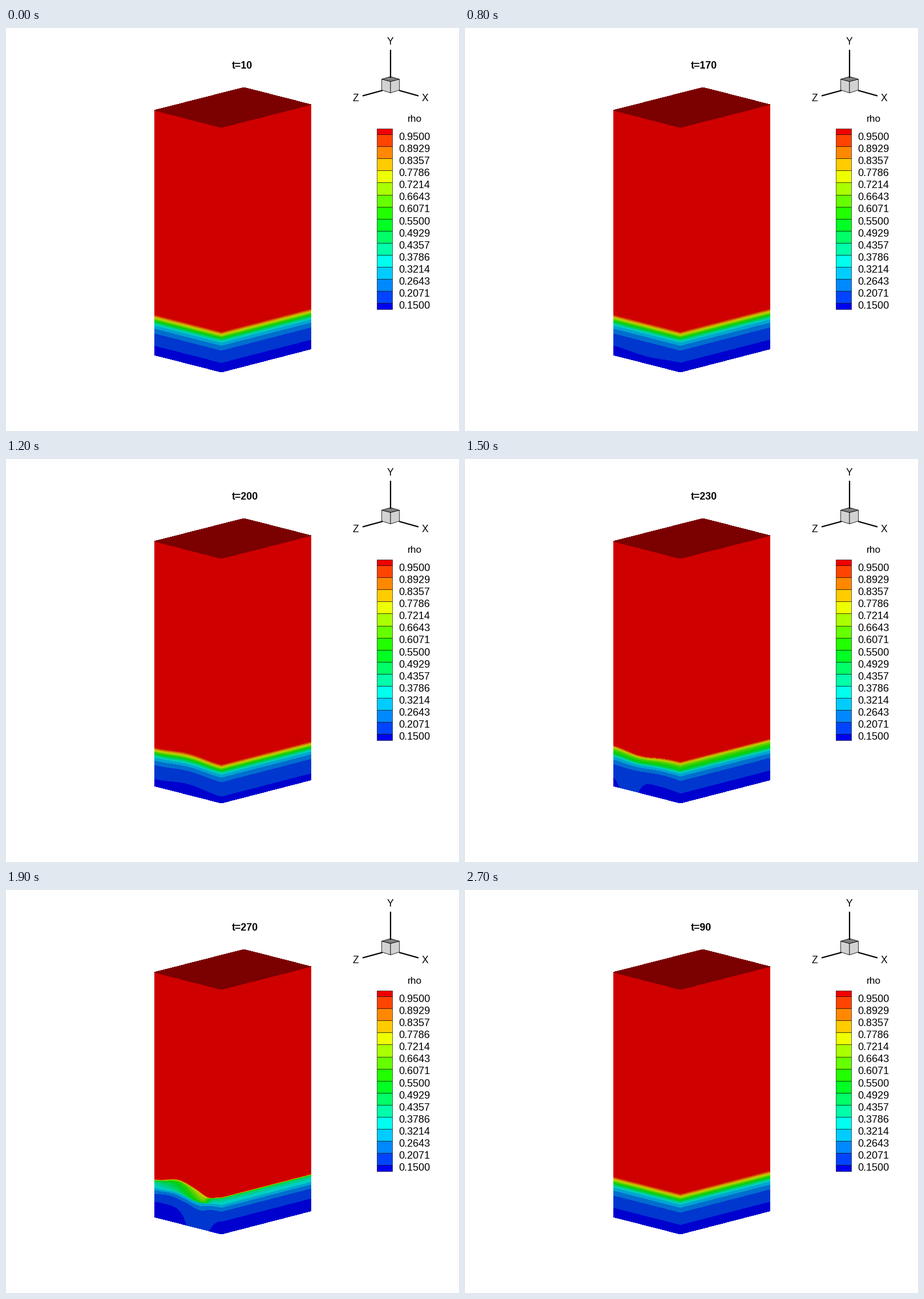
A matplotlib script for the animation above (2.8 s loop, 794x705 px).

```python
import numpy as np
import matplotlib.pyplot as plt
from matplotlib.animation import FuncAnimation
from matplotlib.patches import Polygon, Rectangle

W, H, DPI = 794, 705, 64
LEFT, MID, RIGHT = 260, 377.5, 534.5
LEVELS = 15
S = np.linspace(0, 1, 161)       # position across the left face
COS, SIN = np.cos(2 * np.pi * S), np.sin(2 * np.pi * S)
TIMES = sorted(range(10, 290, 10), key=str)   # shown in text order


def band_colour(k, shade=1.0):
    """Rainbow from blue (0) to red (LEVELS)."""
    v = 4 * k / LEVELS
    rgb = np.clip([v - 2, min(v, 4 - v), 2 - v], 0, 1)
    return tuple(rgb * shade)


def bump(centre, width):
    return np.exp(-((S - centre) / width) ** 2)


def shape_of(low=15.5, second=37, mid=51, top=69.5, centre=0.42, mix=0):
    """Guiding contour heights, plus the level and strength of the mixed layer."""
    return np.array([v + 0 * S for v in (low, second, mid, top, centre, mix)])


REST = shape_of()
EARLY = shape_of(low=13.8 + 2 * COS)
SWELL = shape_of(14.5 - 3.2 * COS + 0.5 * np.cos(np.pi * S),
                 38.3 - 2.3 * COS, 51 - 1.8 * COS, 69 - 2.5 * COS)
DIP = shape_of(np.maximum(19.5 - 3.5 * S ** 6 - 52 * bump(0.23, 0.15), -6),
               38 - 2 * SIN,
               51 - 3.5 * bump(0.35, 0.22),
               71.5 - 7 * bump(0.4, 0.28),
               mix=0.35)
LEFT_BLOB = 27 * (1 - ((S - 0.15) / 0.325) ** 4)
RIGHT_BLOB = 21 * (1 - ((1 - S) / 0.175) ** 2)
ROLL = shape_of(np.maximum(np.maximum(LEFT_BLOB, RIGHT_BLOB), -6),
                38.5 + 5 * bump(0.22, 0.2) - 7 * bump(0.67, 0.15),
                50.5 + 2 * bump(0.3, 0.15) - 6.5 * bump(0.65, 0.2),
                64.5 + 11 * bump(0.36, 0.23) - 7 * bump(0.81, 0.13),
                0.06 + 0.85 * S ** 1.3 / (1 + np.exp((S - 0.8) / 0.03)),
                1)

KEYS = [(140, REST), (170, EARLY), (200, SWELL), (230, DIP), (270, ROLL)]


def state(t):
    if t <= KEYS[0][0]:
        return REST
    for (t0, a), (t1, b) in zip(KEYS, KEYS[1:]):
        if t <= t1:
            break
    w = min((t - t0) / (t1 - t0), 1.12)
    if b is not ROLL:
        w = (1 - np.cos(np.pi * w)) / 2
    return a + (b - a) * w


def contour_heights(t):
    """Height above the base of every level along the left face."""
    low, second, mid, top, centre, mix = state(t)
    mix = np.minimum(mix, 1)

    def step(f):
        return 1 / (1 + np.exp((centre - f) / 0.06))

    rows = [np.minimum(low, second), second, second + 0.6 * (mid - second)]
    for f in np.linspace(0, 1, LEVELS - 3):
        jump = (step(f) - step(0)) / (step(1) - step(0))
        u = (1 - mix) * f ** 0.85 + mix * (0.2 * f + 0.8 * jump)
        rows.append(mid + (top - mid) * u)
    return np.clip(rows, 0, None)


fig = plt.figure(figsize=(W / DPI, H / DPI), dpi=DPI, facecolor="white")
ax = fig.add_axes([0, 0, 1, 1])
ax.set_xlim(0, W)
ax.set_ylim(H, 0)
ax.axis("off")


def px(size):
    return size * 72 / DPI


def shape(points, colour, **kw):
    style = {"lw": 0, "aa": False, **kw}
    return ax.add_patch(Polygon(points, closed=True, fc=colour, **style))


def label(x, y, text, size=18, **kw):
    return ax.text(x, y, text, fontsize=px(size), family="Liberation Sans",
                   va="baseline", **kw)


# Box: silhouette, then the lid
shape([(LEFT, 144), (417, 104), (RIGHT, 134), (RIGHT, 561.5), (MID, 602),
       (LEFT, 572)], band_colour(LEVELS, 0.81))
shape([(LEFT, 144), (417, 104), (RIGHT, 134), (MID, 174)], (0.482, 0, 0))

X = np.append(LEFT + (MID - LEFT) * S, RIGHT)
BASE = np.append(572 + 30 * S, 561.5)
bands = [shape([(0, 0)] * 3, band_colour(k, 0.81)) for k in range(LEVELS)[::-1]][::-1]

# Axis triad
for end, start in (((674, 38), (674, 87)), ((625, 118.7), (660, 109.2)),
                   ((723, 118.7), (689, 109.2))):
    ax.plot(*zip(start, end), color="black", lw=px(2.2), solid_capstyle="butt")
edge = dict(ec="black", lw=px(0.8), joinstyle="round", aa=True)
for side in (-1, 1):
    shape([(674 + 15.5 * side, 89.5), (674, 93.5), (674, 113.5),
           (674 + 15.5 * side, 108.5)], "#d2d2d2", **edge)
shape([(658.5, 89.5), (674, 85), (689.5, 89.5), (674, 93.5)], "#808080", **edge)
for x, y, name in ((673.7, 29, "Y"), (613, 128, "Z"), (734.7, 128, "X")):
    label(x, y, name, 17.5, ha="center")

# Legend
label(716, 164, "rho", 17.3, ha="center")
TOP, BOTTOM, STEP = 175.5, 492, 21.1
for k in range(LEVELS + 1):
    y0 = BOTTOM - 10.55 - STEP * k
    y1 = min(y0 + STEP, BOTTOM)
    y0 = max(y0, TOP)
    shade = 0.94 if k in (0, LEVELS) else 1
    ax.add_patch(Rectangle((649.5, y0), 27, y1 - y0, fc=band_colour(k, shade),
                           ec="black", lw=px(0.6)))
    if k < LEVELS:
        label(688.4, 491.2 - STEP * k, f"{0.15 + 0.8 * k / (LEVELS - 1):.4f}")

title = label(396, 71.3, "", 17.8, weight="bold")


def draw(i):
    t = TIMES[i]
    title.set_text(f"t={t}")
    for band, h in zip(bands, contour_heights(t)):
        upper = BASE - np.append(h, h[-1])
        band.set_xy(np.column_stack([np.r_[X, X[::-1]],
                                     np.r_[upper, BASE[::-1]]]))
    return [title, *bands]


anim = FuncAnimation(fig, draw, frames=len(TIMES), interval=100, repeat=True,
                     repeat_delay=0, blit=False)
plt.show()
```
